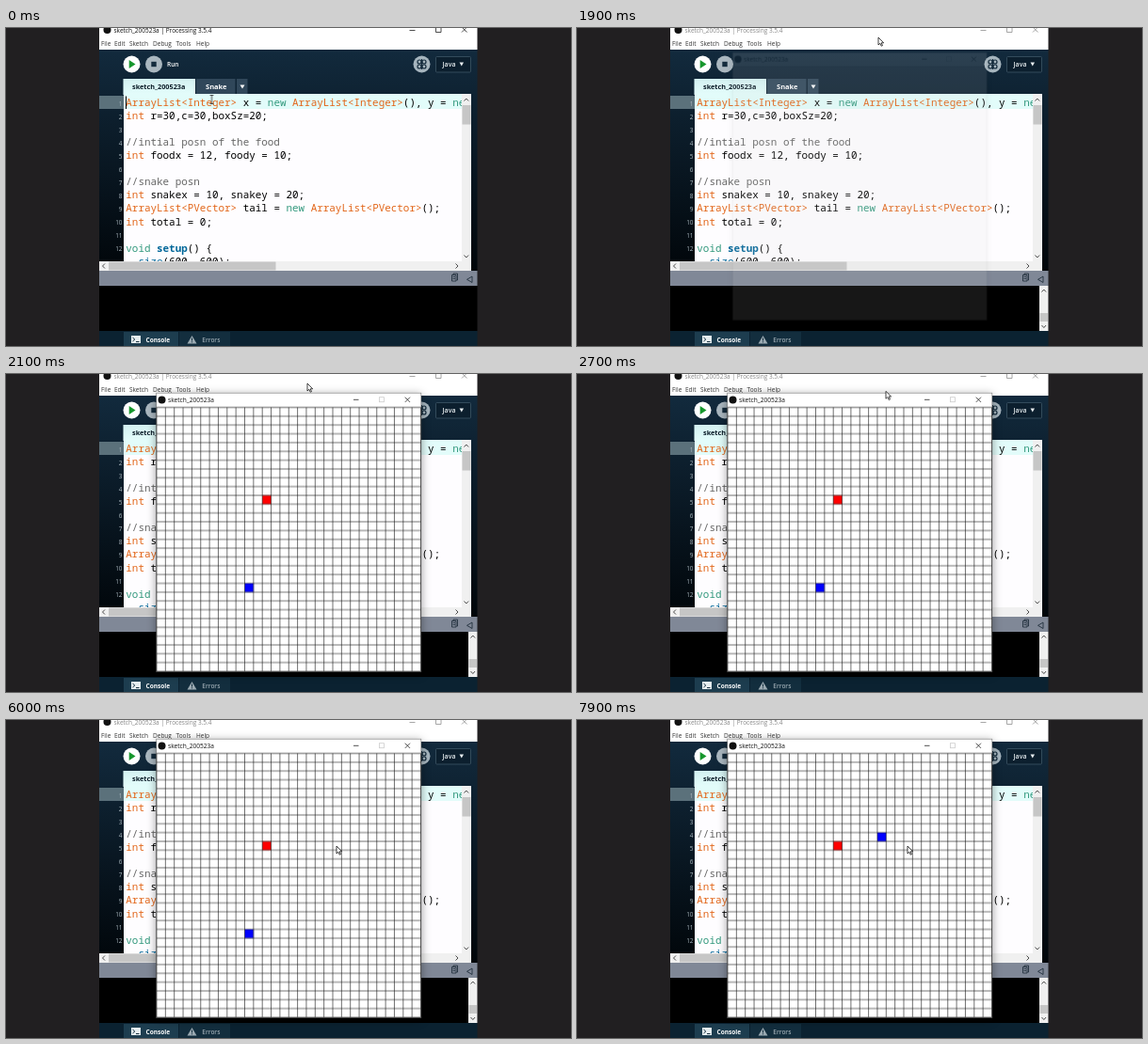
These frames come from a looping animation (600x338 px, 8 s). An HTML page:

```html
<!DOCTYPE html>
<html lang="en">
<head>
<meta charset="utf-8">
<title>Snake sketch</title>
<style>
html, body { margin: 0; width: 100%; height: 100%; overflow: hidden; background: #211f21; }
#stage { display: block; width: 100vw; height: 100vh; }
text { font-family: "Open Sans", "Noto Sans", sans-serif; font-size: 6.5px; white-space: pre; }
.b { font-weight: 700; }
.m { font-weight: 600; }
.code text { font: 10.92px "Noto Sans Mono", "DejaVu Sans Mono", monospace; fill: #000; }
.type { fill: #e2661a; }
.key { fill: #33997e; }
.fn { fill: #006699; }
.note { fill: #666; }
.nums text { font-size: 6.4px; fill: #a9b6be; text-anchor: end; }
.line { fill: none; stroke: #222; stroke-width: .8; }
.shade { filter: drop-shadow(0 2px 5px rgba(0, 0, 0, .4)); }

/* one 8 s loop; 1% = 80 ms */
.anim { animation: 8s step-end -20ms infinite; }
#cursor { animation-name: point; }
#beam { animation-name: early; }
#arrow { animation-name: late; }
#hint { animation-name: hint; }
#scroll { animation-name: scroll; }
#title { animation-name: blur; }
#caret { animation-name: caret; }
#win { animation-name: open; transform-origin: 300px 168px; }
#paper { animation-name: paper; }
#drawn { animation-name: drawn; }
#snake { animation-name: crawl; }

@keyframes point {
  0% { transform: translate(218.5px, 76px); animation-timing-function: steps(3); }
  3.75% { transform: translate(232px, 84px); }
  6.25% { transform: translate(244px, 70px); animation-timing-function: steps(5); }
  12.5% { transform: translate(299.5px, 28px); animation-timing-function: steps(6); }
  20% { transform: translate(320px, 10px); }
  30% { transform: translate(320px, 10px); animation-timing-function: steps(3); }
  33.75% { transform: translate(328px, 18.3px); animation-timing-function: steps(3); }
  37.5%, 100% { transform: translate(351px, 134px); }
}
@keyframes early { 0% { opacity: 1; } 6.25%, 100% { opacity: 0; } }
@keyframes late { 0% { opacity: 0; } 6.25%, 100% { opacity: 1; } }
@keyframes hint { 0% { opacity: 1; } 7.5%, 100% { opacity: 0; } }
@keyframes scroll { 0% { opacity: 0; } 7.5%, 100% { opacity: 1; } }
@keyframes blur { 0% { opacity: 1; } 22.5%, 100% { opacity: .5; } }
@keyframes caret { 0% { opacity: 1; } 22.5%, 100% { opacity: 0; } }
@keyframes open {
  0% { opacity: 0; transform: scale(.955); }
  22.5% { opacity: .02; transform: scale(.955); }
  23.75% { opacity: .11; transform: scale(.96); }
  25% { opacity: .84; transform: scale(.992); }
  26.25%, 100% { opacity: 1; transform: none; }
}
@keyframes paper { 0% { fill: #ccc; } 25%, 100% { fill: #fff; } }
@keyframes drawn { 0% { opacity: 0; } 25%, 100% { opacity: 1; } }
@keyframes crawl {
  0% { transform: translate(93.5px, 187px); }
  77.5% { transform: translate(93.5px, 168.3px); animation-timing-function: steps(8); }
  87.5% { transform: translate(93.5px, 93.5px); }
  90% { transform: translate(102.85px, 84.15px); animation-timing-function: steps(4); }
  95% { transform: translate(140.25px, 84.15px); }
  97.5% { transform: translate(149.6px, 84.15px); }
  98.75%, 100% { transform: translate(158.95px, 84.15px); }
}
</style>
</head>
<body>
<svg id="stage" viewBox="0 0 600 338" preserveAspectRatio="none">
  <defs>
    <linearGradient id="navy" x1="0" y1="0" x2="0" y2="1">
      <stop offset="0" stop-color="#122a3d"/><stop offset="1" stop-color="#01060a"/>
    </linearGradient>
    <linearGradient id="tab" x1="0" y1="0" x2="0" y2="1">
      <stop offset="0" stop-color="#d3f1f1"/><stop offset="1" stop-color="#e4fdfb"/>
    </linearGradient>
  </defs>
  <rect width="600" height="338" fill="#211f21"/>

  <!-- editor window -->
  <rect x="99" y="23" width="401.500" height="235" fill="url(#navy)"/>
  <rect x="99" width="401.500" height="23" fill="#fff"/>
  <circle cx="107.500" cy="2" r="4" fill="#111"/>
  <g id="title" class="anim">
    <text x="114.500" y="4.600" fill="#111">sketch_200523a | Processing 3.5.4</text>
    <path class="line" d="M428.500 2.500h6M456.500-1v5.500h5.500V-1M484-1l5.500 5.500M489.500-1l-5.500 5.500"/>
  </g>
  <g id="menu" fill="#333"></g>

  <circle cx="133.500" cy="38.500" r="9" fill="#fff"/>
  <path d="M130.700 34v9l6.800-4.500z" fill="#17972d"/>
  <circle cx="157" cy="38.500" r="9" fill="#aab7bf"/>
  <rect x="154.300" y="35.800" width="5.400" height="5.400" fill="#142b3c"/>
  <text id="hint" class="anim m" x="171" y="41" fill="#fff">Run</text>
  <circle cx="441.500" cy="38.500" r="9" fill="#a6b5be"/>
  <g fill="none" stroke="#142b3c" stroke-width="1.200">
    <circle cx="439" cy="36" r="2"/><circle cx="444" cy="36" r="2"/>
    <circle cx="439" cy="41" r="2"/><circle cx="444" cy="41" r="2"/>
    <path d="M441.500 33v11"/>
  </g>
  <rect x="456.500" y="30.500" width="37" height="16.500" rx="1" fill="#0c1f2e" stroke="#3e5666" stroke-width=".8"/>
  <text class="m" x="463.500" y="41" fill="#e8eef0" style="font-size:7px">Java</text>
  <path d="M481.500 36.500h4.500l-2.200 4z" fill="#e8eef0"/>

  <rect x="124.500" y="54" width="76.500" height="17" fill="url(#tab)"/>
  <text class="b" x="134" y="65" fill="#0c1c28" style="font-size:7.300px">sketch_200523a</text>
  <rect x="202" y="54" width="41.500" height="16" fill="#30475a"/>
  <text class="b" x="212" y="65" fill="#fff" style="font-size:7.500px">Snake</text>
  <rect x="245" y="54" width="11.500" height="16" fill="#30475a"/>
  <path d="M248.500 60.500h5l-2.500 4z" fill="#fff"/>

  <rect x="99" y="72" width="26" height="14" fill="#5b717b"/>
  <g id="nums" class="nums"></g>
  <svg x="125" y="70" width="359" height="178" viewBox="125 70 359 178">
    <rect x="125" y="70" width="359" height="178" fill="#fefdff"/>
    <rect x="125" y="70" width="359" height="16" fill="#e2fcfa"/>
    <g id="code" class="code"></g>
    <rect id="caret" class="anim" x="127" y="72.500" width="1" height="13.500"/>
  </svg>
  <rect x="484" y="70" width="10" height="178" fill="#f0f0f0"/>
  <rect x="484.500" y="82" width="9" height="20.500" fill="#c6c6c6"/>
  <path class="line" d="M486.500 77.500l2.300-2.500 2.300 2.500M486.500 241.500l2.300 2.500 2.300-2.500"/>
  <rect x="99" y="248" width="395" height="10" fill="#f0f0f0"/>
  <rect x="109" y="248.500" width="177.500" height="9" fill="#c6c6c6"/>
  <path class="line" d="M105 250.500l-2.500 2.500 2.500 2.500M477.500 250.500l2.500 2.500-2.500 2.500"/>

  <rect x="99" y="258" width="401.500" height="16" fill="#808897"/>
  <path d="M473.500 262.500h4.500v6.500h-4.500zM475 262v-1h4.500v7h-1M474.500 264.500h2.500M474.500 266.500h2.500M495 264v6.500l-5.500-3.200z" fill="none" stroke="#172633" stroke-width=".8"/>
  <rect x="99" y="274" width="401.500" height="48" fill="#000"/>
  <g id="scroll" class="anim">
    <rect x="491" y="274" width="9.500" height="48" fill="#f0f0f0"/>
    <rect x="491.500" y="303" width="8.500" height="9" fill="#c6c6c6"/>
    <path class="line" d="M493.500 280.500l2.300-2.500 2.300 2.500M493.500 316l2.300 2.500 2.300-2.500"/>
  </g>
  <rect x="99" y="322" width="401.500" height="16" fill="#0b2231"/>
  <rect x="125" y="323" width="58" height="15" fill="#1d3d4f"/>
  <rect x="184" y="323" width="54" height="15" fill="#132e3e"/>
  <rect x="133" y="327" width="10" height="8" fill="#e6eef0"/>
  <path d="M134.500 329l2.300 2-2.300 2M138 333.500h3.500" fill="none" stroke="#17303f"/>
  <text class="b" x="148.500" y="333.500" fill="#fff">Console</text>
  <path d="M197.500 327l5 8.500h-10z" fill="#9aa9b1"/>
  <path d="M197.500 329.500v3M197.500 333.300v1" stroke="#132e3e"/>
  <text class="m" x="208.300" y="333.500" fill="#9aa9b1">Errors</text>

  <!-- sketch window -->
  <g id="win" class="anim">
    <rect class="shade" x="159.400" y="19.900" width="281.700" height="296.900" fill="#777"/>
    <rect x="160" y="20.500" width="280.500" height="15" fill="#fff"/>
    <circle cx="165.500" cy="27.500" r="4" fill="#111"/>
    <text x="172" y="30" fill="#111" style="font-size:6.600px">sketch_200523a</text>
    <path class="line" d="M369 27.300h5.500M423.800 24.700l5.200 5.200M429 24.700l-5.200 5.200"/>
    <rect x="396.500" y="24.700" width="5" height="5" fill="none" stroke="#ccc" stroke-width=".8"/>
    <rect id="paper" class="anim" x="160" y="35.500" width="280.500" height="280.500"/>
    <g id="drawn" class="anim">
      <g transform="translate(160 35.500)">
        <rect x="112.200" y="93.500" width="9.350" height="9.350" fill="#f00"/>
        <rect id="snake" class="anim" width="9.350" height="9.350" fill="#00f"/>
        <path id="grid" fill="none" stroke="#111" stroke-width=".6"/>
      </g>
    </g>
  </g>

  <g id="cursor" class="anim">
    <path id="beam" class="anim line" d="M-1.800-4.500H1.800M0-4.500v9M-1.800 4.500H1.800"/>
    <path id="arrow" class="anim" d="M0 0v8l1.900-1.700 1.300 2.900 1.300-.6-1.300-2.800h2.500z" fill="#fff" stroke="#111" stroke-width=".8"/>
  </g>
</svg>
<script>
const $ = id => document.getElementById(id);

function add(parent, tag, attrs, content = "") {
  const el = document.createElementNS("http://www.w3.org/2000/svg", tag);
  for (const k in attrs) el.setAttribute(k, attrs[k]);
  el.textContent = content;
  parent.append(el);
  return el;
}

const menu = { File: 101, Edit: 115, Sketch: 131, Debug: 156, Tools: 180.5, Help: 202 };
for (const name in menu) add($("menu"), "text", { x: menu[name], y: 19 }, name);

const code = `ArrayList<Integer> x = new ArrayList<Integer>(), y = new ArrayList<Integer>();
int r=30,c=30,boxSz=20;

//intial posn of the food
int foodx = 12, foody = 10;

//snake posn
int snakex = 10, snakey = 20;
ArrayList<PVector> tail = new ArrayList<PVector>();
int total = 0;

void setup() {
  size(600, 600);`;

const styles = [
  [/^\/\//, "note"],
  [/^(int|ArrayList|Integer|PVector|[<>])$/, "type"],
  [/^(new|void)$/, "key"],
  [/^setup$/, "fn b"],
  [/^size$/, "fn"]
];

code.split("\n").forEach((line, i) => {
  const y = 82.8 + 14.08 * i;
  const row = add($("code"), "text", { x: 127.3, y });
  for (const word of line.split(/(\/\/.*|\w+|[<>])/)) {
    const style = styles.find(([re]) => re.test(word));
    add(row, "tspan", { class: style ? style[1] : "" }, word);
  }
  if (i < 12) add($("nums"), "text", { x: 123.5, y: y - .2 }, i + 1);
});

const cell = 9.35, side = 30 * cell;
let grid = "";
for (let i = 0; i <= 30; i++) grid += `M${i * cell} 0v${side}M0 ${i * cell}h${side}`;
$("grid").setAttribute("d", grid);
</script>
</body>
</html>
```
